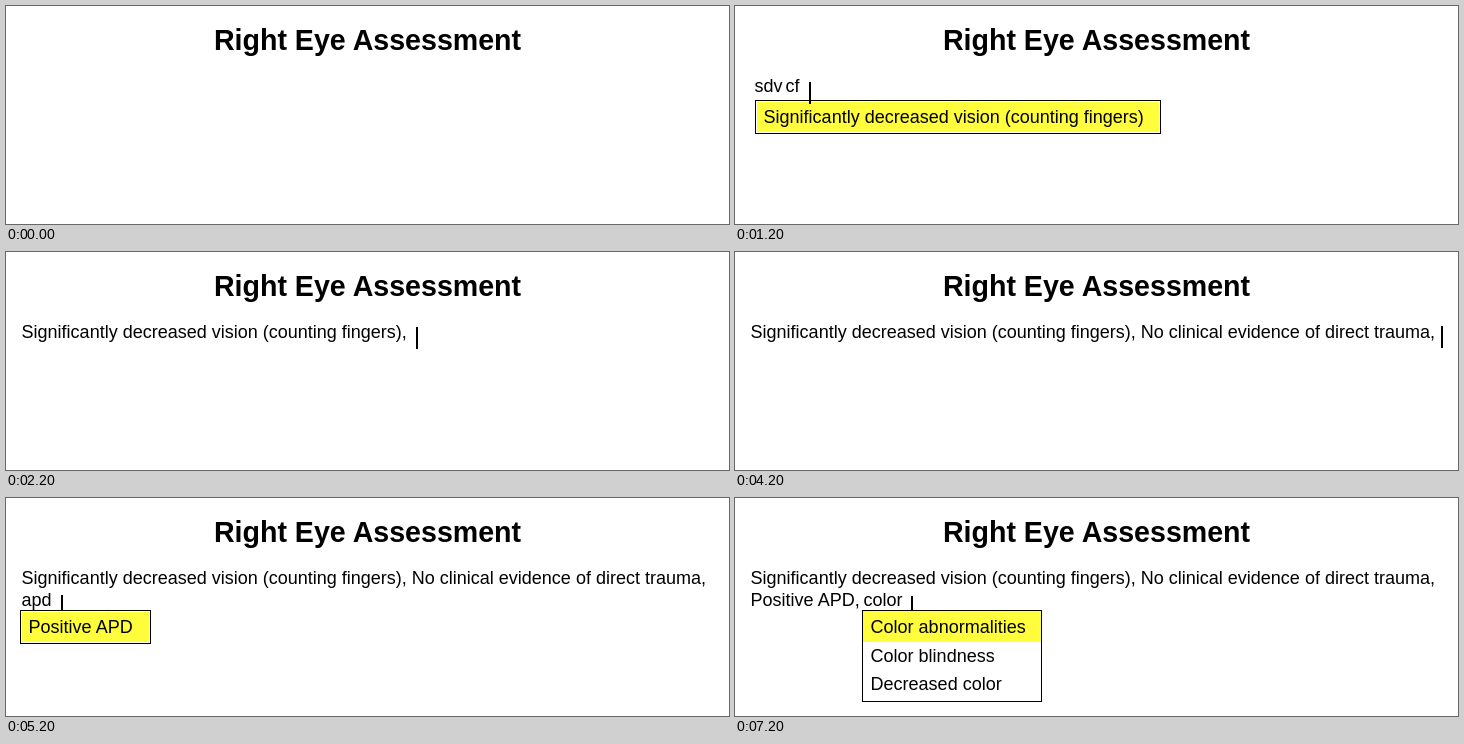
These frames come from a looping animation (723x218 px, 8000 ms). An HTML page:

```html
<!DOCTYPE html>
<html lang="en">
<head>
<meta charset="utf-8">
<title>Right Eye Assessment</title>
<style>
  html, body { margin: 0; width: 100%; height: 100%; overflow: hidden; background: #fff; }
  svg { display: block; width: 100%; height: 100%; }
  text { font: 18px "Liberation Sans", Arial, sans-serif; white-space: pre; }
  .title { font-size: 28.6px; font-weight: bold; text-anchor: middle; }
  .box { fill: #fff; stroke: #000; }
  .pick { fill: #fffd3c; }
  .hand { fill: #fff; stroke: #000; stroke-width: 2; stroke-linejoin: round; }
</style>
</head>
<body>
<svg viewBox="0 0 723 218">
  <text class="title" x="361.5" y="44">Right Eye Assessment</text>
  <g id="scene"></g>
</svg>
<script>
const scene = document.getElementById("scene");
const LOOP = 8000, START = 200, STEP = 1000;
const ROW1 = 86, ROW2 = 108, LEFT = 15.6;

const text = (x, y, s) => `<text x="${x}" y="${y}">${s}</text>`;
const rect = (cls, x, y, w, h) =>
  `<rect class="${cls}" x="${x}" y="${y}" width="${w}" height="${h}"/>`;
const caret = (x, y, h = 22) => rect("caret", x, y, 2, h);

// Suggestion list: the first item is highlighted.
function popup(x, y, w, h, items, gap = 1) {
  return rect("box", x + .5, y + .5, w - 1, h - 1) +
    rect("pick", x + 1 + gap, y + 1 + gap, w - 2 - 2 * gap, 30 + (gap ? 0 : 1)) +
    items.map((s, i) => text(x + 8.6, y + 23 + Math.round(i * 28.5), s)).join("");
}

const vision = "Significantly decreased vision (counting fingers)";
const trauma = "No clinical evidence of direct trauma";
const apd = "Positive APD";
const first = text(LEFT, ROW1, `${vision}, `);
const both = text(LEFT, ROW1, `${vision}, ${trauma},`);
const third = both + text(LEFT, ROW2, `${apd},`);
const hand = `<path class="hand" d="M26 110V94q0-2 2-2t2 2v8q4-2 5 1 4-2 5 1
  5-1 6 3v6l-3 7H29L18 109q1-5 8 1z"/>`;

const states = [
  "",
  hand,
  text(19.6, ROW1, "sdv") + text(50.4, ROW1, "cf") +
    popup(20, 94, 406, 34, [vision]) + caret(74, 76),
  first + caret(410, 75),
  first + text(405.6, ROW1, "nce") + text(436.4, ROW1, "dt") +
    caret(460, 75, 17) + popup(405, 91, 311, 34, [trauma]),
  both + caret(706, 74),
  both + text(LEFT, ROW2, "apd") + caret(55, 97, 16) + popup(14, 112, 131, 34, [apd]),
  third + caret(131, 97),
  third + text(128.6, ROW2, "color") + caret(176, 98, 15) +
    popup(127, 112, 180, 92, ["Color abnormalities", "Color blindness", "Decreased color"], 0)
];

let shown = -1;
function draw() {
  const t = performance.now() % LOOP;
  const index = t < START ? 0 : 1 + Math.floor((t - START) / STEP);
  if (index !== shown) scene.innerHTML = states[shown = index];
  requestAnimationFrame(draw);
}
draw();
</script>
</body>
</html>
```
